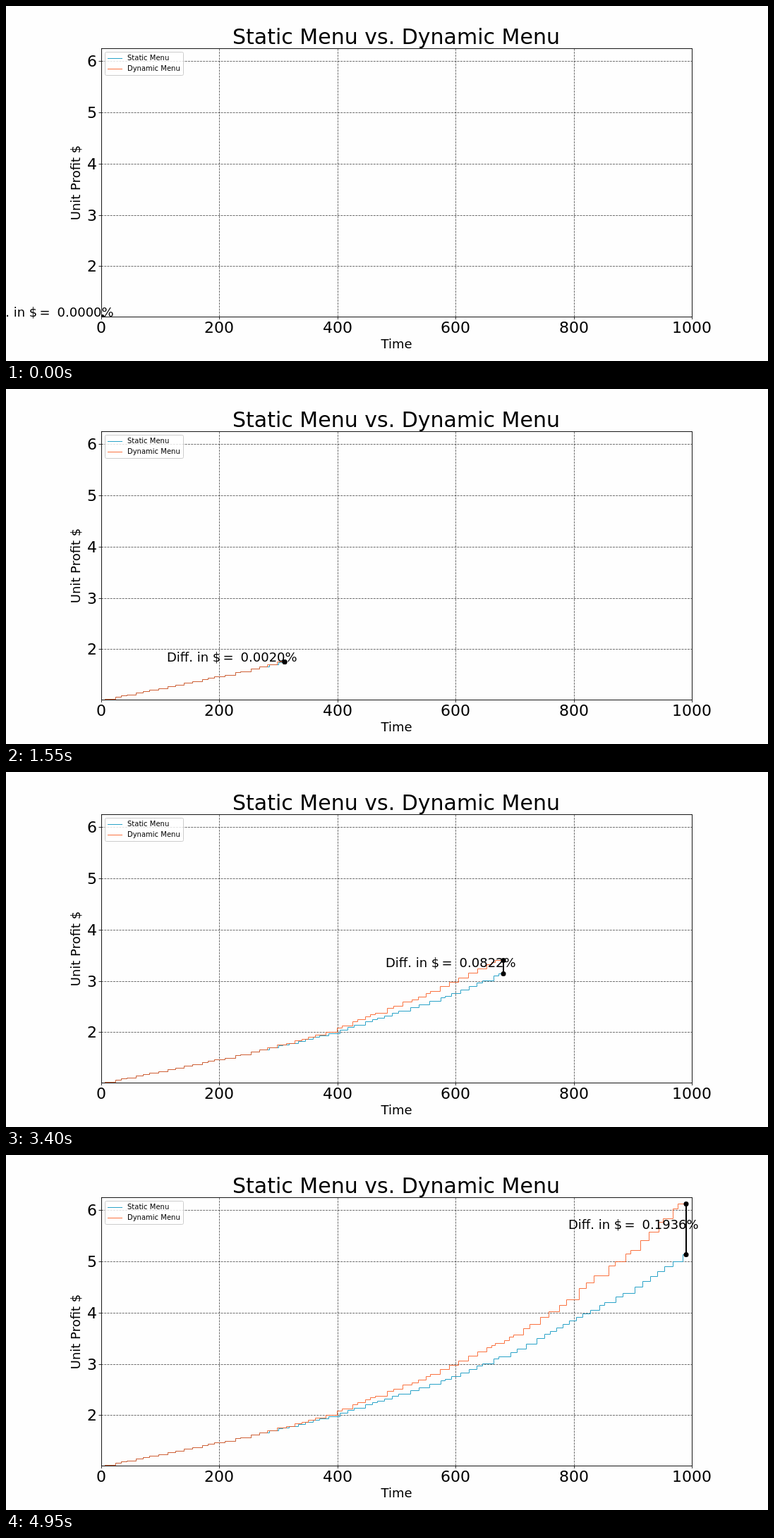
These frames come from a looping animation (1080x504 px, 5000 ms). An HTML page:

```html
<!DOCTYPE html>
<html lang="en">
<head>
<meta charset="utf-8">
<title>Static Menu vs. Dynamic Menu</title>
<style>
html, body { margin: 0; width: 100%; height: 100%; overflow: hidden; background: #fefefe; }
svg { display: block; width: 1080px; height: 504px; font-family: "DejaVu Sans", sans-serif; }
.mid { text-anchor: middle; }
.end { text-anchor: end; }
.tick { font-size: 22px; }
.label { font-size: 18px; }
.grid { stroke: #000; stroke-width: .8; stroke-opacity: .7; stroke-dasharray: 2.96 1.28; }
.mark { stroke: #000; stroke-width: .8; }
.fixed { stroke: #2ba3c8; }
.varied { stroke: #f95012; stroke-opacity: .8; }
</style>
</head>
<body>
<svg viewBox="0 0 1080 504">
  <clipPath id="plot"><rect x="135" y="60" width="837.5" height="382"/></clipPath>
  <g id="axes"></g>
  <g clip-path="url(#plot)" fill="none">
    <path id="static" class="fixed"/>
    <path id="dynamic" class="varied"/>
    <path id="gap" stroke="#000" stroke-width="2"/>
    <circle id="low" r="3.5" fill="#000"/>
    <circle id="high" r="3.5" fill="#000"/>
  </g>
  <rect x="135.5" y="60.5" width="837" height="381" fill="none" stroke="#000" stroke-width=".9"/>
  <rect x="140.5" y="65.5" width="111" height="33" rx="2" fill="#fff" fill-opacity=".8" stroke="#ccc"/>
  <path class="fixed" d="M144 74.5h21"/>
  <path class="varied" d="M144 89.5h21"/>
  <g font-size="10"><text x="172" y="77">Static Menu</text><text x="172" y="92">Dynamic Menu</text></g>
  <text class="mid" x="553" y="54" font-size="30">Static Menu vs. Dynamic Menu</text>
  <text class="mid label" x="553.5" y="486">Time</text>
  <text class="mid label" transform="translate(105 251) rotate(-90)">Unit Profit $</text>
  <g id="note" class="label">
    <text>Diff. in $</text><text x="79.6">=</text><text id="diff" x="104.6"></text>
  </g>
</svg>
<script>
const $ = id => document.getElementById(id);
const X = n => 135 + .837 * n;
const Y = v => 369.4 - (v - 2) * 72.8;
const value = y => 2 + (369.4 - y) / 72.8;
const snap = p => Math.round(p) + .5;

let seed = 7;
const random = () => (seed = seed * 16807 % 2147483647) / 2147483647;

// Fills the way between key steps [x, y] with steps of uneven length
function staircase(keys) {
  const steps = [keys[0]];
  for (let k = 1; k < keys.length; k++) {
    const [x0, y0] = keys[k - 1], [x1, y1] = keys[k];
    const count = Math.max(1, Math.floor((x1 - x0) / 10.5));
    const lengths = Array.from({ length: count }, () => .5 + random());
    const total = lengths.reduce((a, b) => a + b);
    let part = 0;
    for (const length of lengths) {
      part += length / total;
      steps.push([x0 + (x1 - x0) * part, y0 + (y1 - y0) * part]);
    }
  }
  return steps;
}

const shared = staircase([[135, 441], [240, 420], [295, 408], [310, 406], [359, 394]]);
const branch = keys => shared.concat(staircase([[359, 394], ...keys]));
const fixed = branch([
  [392, 387], [457, 371], [556, 339], [573, 334], [622, 318], [698, 286],
  [715, 280], [789, 240], [874, 196], [891, 187], [959, 141]
]);
const varied = branch([
  [384, 386.74], [397, 385], [453, 369], [562, 326.44], [575, 323], [693, 267.18],
  [706, 263], [784, 213], [833, 171], [885, 135.36], [952, 68.59]
]);

let axes = "";
for (let n = 0; n <= 1000; n += 200) {
  const x = snap(X(n));
  if (n % 1000) axes += `<path class="grid" d="M${x} 441V60"/>`;
  axes += `<path class="mark" d="M${x} 441v4"/><text class="mid tick" x="${Math.round(X(n))}" y="464">${n}</text>`;
}
for (let v = 2; v <= 6; v++) {
  const y = snap(Y(v));
  axes += `<path class="grid" d="M135 ${y}H972"/><path class="mark" d="M135 ${y}h-3.5"/>` +
    `<text class="end tick" x="129" y="${y + 7.5}">${v}</text>`;
}
$("axes").innerHTML = axes;

// Draws the steps up to x and returns the last height
function trace(id, steps, x) {
  const done = steps.filter(s => s[0] <= x + .01);
  $(id).setAttribute("d", "M135.5 441.5" + done.map(s => `H${snap(s[0])}V${snap(s[1])}`).join("") + `H${x}`);
  return done[done.length - 1][1];
}

function dot(id, x, y) {
  $(id).setAttribute("cx", x);
  $(id).setAttribute("cy", snap(y));
}

function draw(now) {
  const n = Math.floor(now % 5000 / 50) * 10;
  const x = Math.round(X(n + 1));
  const low = trace("static", fixed, x);
  const high = trace("dynamic", varied, x);
  $("gap").setAttribute("d", `M${x} ${low}V${high}`);
  dot("low", x, low);
  dot("high", x, high);
  $("note").setAttribute("transform", `translate(${Math.round(X(n - 199))} ${Math.round((low + high) / 2)})`);
  $("diff").textContent = Math.abs(value(high) / value(low) - 1).toFixed(4) + "%";
}

const start = performance.now();
function loop() {
  draw(performance.now() - start);
  requestAnimationFrame(loop);
}
loop();
</script>
</body>
</html>
```
